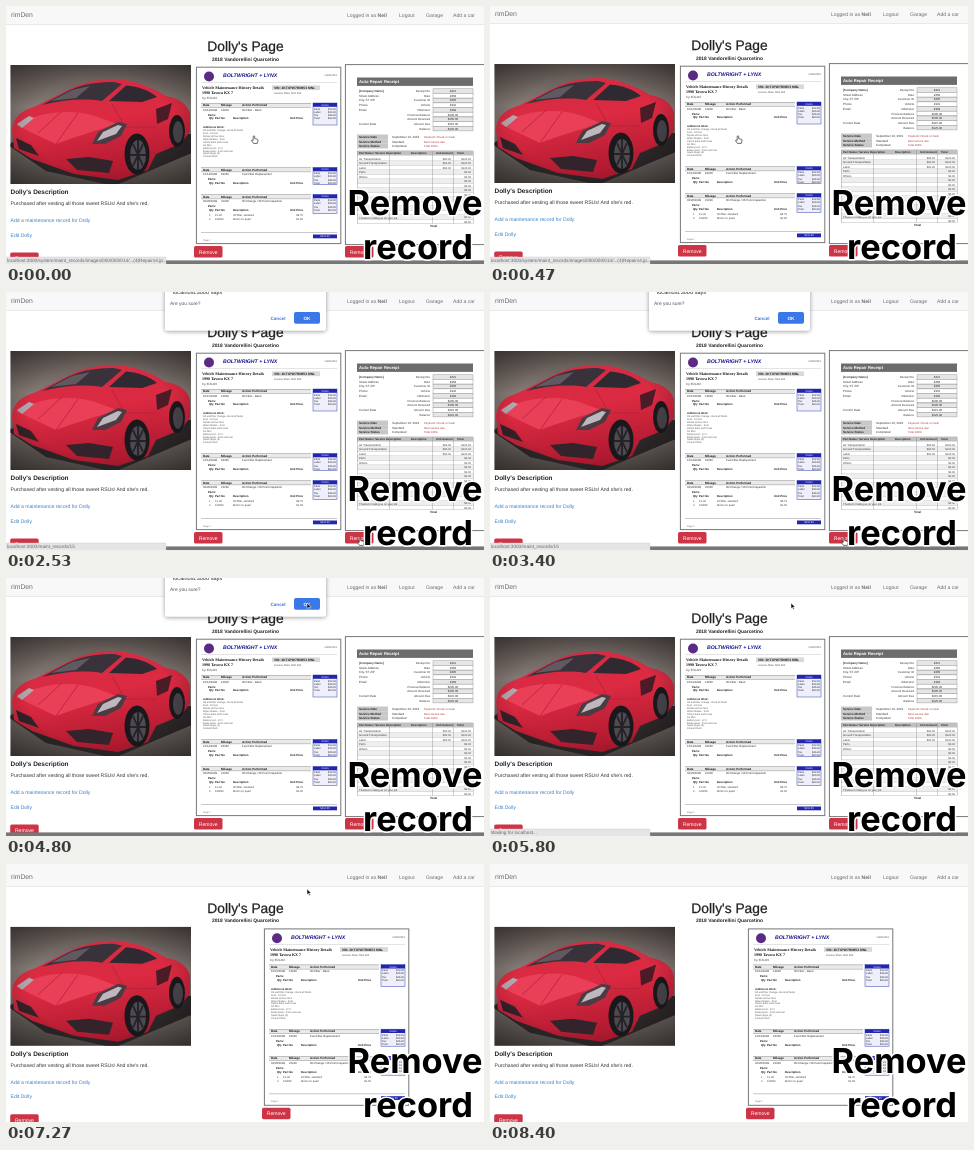
Animation, 478 px wide and 258 px high, one loop 8740 ms. Source, as an HTML page:

```html
<!DOCTYPE html>
<html lang="en">
<head>
<meta charset="utf-8">
<title>Remove record</title>
<style>
  html, body { margin: 0; width: 100%; height: 100%; overflow: hidden; background: #fff; }
  svg { display: block; width: 478px; height: 258px; font-family: "Liberation Sans", Arial, sans-serif; text-rendering: geometricPrecision; }
  .b { font-weight: bold; }
  .serif { font-family: "Liberation Serif", Times, serif; }
  .big { font: 700 34.4px Inter, "Open Sans", sans-serif; text-anchor: middle; paint-order: stroke; stroke: #fff; stroke-width: 3; stroke-linejoin: round; }
</style>
</head>
<body>
<svg id="stage" viewBox="0 0 478 258">
  <defs>
    <linearGradient id="wall" x2="0" y2="1">
      <stop offset="0" stop-color="#5a514d"/><stop offset=".35" stop-color="#857b76"/>
      <stop offset=".55" stop-color="#7a716c"/><stop offset="1" stop-color="#4f4946"/>
    </linearGradient>
    <linearGradient id="paint" x2=".3" y2="1">
      <stop offset="0" stop-color="#d22c43"/><stop offset=".5" stop-color="#dc2a42"/><stop offset="1" stop-color="#b01a30"/>
    </linearGradient>
    <radialGradient id="vignette" r=".72">
      <stop offset=".55" stop-opacity="0"/><stop offset="1" stop-opacity=".4"/>
    </radialGradient>
    <filter id="shadow" x="-10%" y="-30%" width="120%" height="170%">
      <feDropShadow dx="0" dy="1" stdDeviation="2" flood-opacity=".4"/>
    </filter>
    <filter id="soft"><feGaussianBlur stdDeviation=".6"/></filter>
    <clipPath id="frame"><rect x="4.5" y="59" width="180.5" height="119"/></clipPath>
  </defs>
  <g id="page">
    <g id="base"></g>
    <g id="car" clip-path="url(#frame)">
      <rect x="4" y="59" width="182" height="120" fill="url(#wall)"/>
      <g filter="url(#soft)">
        <path d="M2 139L40 165L108 180L188 146V128H20z" fill="#2b2628"/>
        <path d="M6 124C7 111 15 105 30 100L60 85C74 77 90 73 108 73C126 73 146 81 160 90C174 92 182 99 184 108L184 126L174 138L150 148L142 164L112 174L68 168L26 153L8 142z" fill="url(#paint)"/>
        <path d="M36 99L60 86C73 79 90 75.5 108 76L116 78L96 95C77 92 56 94 36 99z" fill="#39323a"/>
        <path d="M45 95L66 84L84 80L70 92z" fill="#605960"/>
        <path d="M103 95L120 79.5C132 80 144 85 151 91L136 96z" fill="#2f2a31"/>
        <path d="M10 119C34 105 68 102 92 111L111 118C92 124 68 131 50 138z" fill="#e94058"/>
        <path d="M50 138L72 107M32 127L56 105M106 98L119 121L150 121" fill="none" stroke="#b02238" stroke-width=".8"/>
        <path d="M86 138L92 126L112 116L121 118L115 130L99 138z" fill="#4b3c44"/>
        <path d="M91 135L97 126L112 119L116 120L110 128z" fill="#bdb8bd"/>
        <path d="M11 118L23 110L28 112L16 122z" fill="#b0a8ad"/>
        <path d="M10 132L25 139L33 150L13 143z" fill="#33232a"/>
        <path d="M60 153L83 151L107 155L103 167L71 164z" fill="#33232a"/>
        <path d="M150 103L166 97L162 113L151 118z" fill="#4b1c27"/>
        <ellipse cx="131" cy="148" rx="12.5" ry="20.5" fill="#1b181c"/>
        <ellipse cx="132" cy="149" rx="8" ry="15" fill="#4d4a50"/>
        <path d="M132 134V164M124 149H140M127 138L137 160M137 138L127 160" stroke="#242127" stroke-width="1.8"/>
        <ellipse cx="171" cy="125" rx="8" ry="16" fill="#1b181c"/>
        <ellipse cx="172" cy="126" rx="5" ry="11" fill="#454148"/>
      </g>
      <rect x="4" y="59" width="182" height="120" fill="url(#vignette)"/>
    </g>
    <g id="first"></g>
    <g id="second"></g>
  </g>
  <rect id="edge" y="254.4" width="478" height="3.6" fill="#777"/>
  <g id="status"><rect x="-2" y="251" height="9" rx="1" fill="#e4e5e7" stroke="#c8c8c8" stroke-width=".4"/><text x="1" y="256.3" font-size="4.7" fill="#666"></text></g>
  <g id="dialog"></g>
  <g id="arrow"><path d="M0 0V5.6L1.4 4.4L2.3 6.4L3.3 6L2.4 4H4.2z" fill="#111" stroke="#fff" stroke-width=".5"/></g>
  <g id="hand"><path d="M-.8 .2Q0-.7 .7 .2V2.6L3.6 3.4Q4.2 3.8 4 5L3.3 7.4H-.6L-2.5 4.6Q-2.4 3.5-.8 4.4z" fill="#fff" stroke="#222" stroke-width=".65"/></g>
  <text class="big" x="409" y="209">Remove</text>
  <text class="big" x="412" y="253">record</text>
</svg>
<script>
const LOOP = 8740;
const $ = id => document.getElementById(id);
const text = (x, y, size, s, fill = "#333", more = "") =>
  `<text x="${x}" y="${y}" font-size="${size}" fill="${fill}" ${more}>${s}</text>`;
const rect = (x, y, w, h, fill, more = "") =>
  `<rect x="${x}" y="${y}" width="${w}" height="${h}" fill="${fill}" ${more}/>`;
const rule = (x, y, w, fill = "#999", h = .4) => rect(x, y, w, h, fill);
const bold = 'class="b"', mid = 'text-anchor="middle"', end = 'text-anchor="end"';
const sheet = 'stroke="#777" stroke-width="1"';
const button = (x, y) => rect(x, y, 28.5, 11.5, "#cd3546", 'rx="1.6"') +
  text(x + 14.2, y + 7.6, 5.1, "Remove", "#fff", mid);

function basePage() {
  const link = "#3a80c4", grey = "#6c6c6c";
  return rect(0, -6, 478, 24.5, "#f8f8f8") + rule(0, 18.3, 478, "#dedede", .6) +
    text(5, 11.3, 6.8, "rimDen", grey) +
    text(341, 11, 5.1, 'Logged in as <tspan class="b">Neil</tspan>', grey) +
    text(393, 11, 5.1, "Logout", grey) +
    text(420, 11, 5.1, "Garage", grey) +
    text(447, 11, 5.1, "Add a car", grey) +
    text(239.5, 45, 13.8, "Dolly's Page", "#222", mid + ' stroke="#222" stroke-width=".25"') +
    text(239.5, 54.6, 4.9, "2018 Vandorellini Quarcetino", "#222", mid + " " + bold) +
    text(4.5, 188, 6.45, "Dolly's Description", "#222", bold) +
    text(4.5, 199, 5.1, "Purchased after vesting all those sweet RSUs! And she's red.") +
    text(4.5, 216, 5.1, "Add a maintenance record for Dolly", link) +
    text(4.5, 230.6, 5.1, "Edit Dolly", link) +
    button(4.2, 246.5);
}

// One service block: heading row, parts row and a cost box on the right
function service(y, date, miles, action, h) {
  const box = rect(307, y, 24, h, "#eeeffa", 'stroke="#3340b4" stroke-width=".5"') +
    rect(307, y, 24, 3.8, "#2026b0") + text(319, y + 2.9, 2.8, "Costs", "#fff", mid);
  let costs = "";
  ["Parts", "Labor", "Tax", "Total"].forEach((s, i) => {
    const ly = y + 6.6 + i * 3.2;
    if (ly < y + h) costs += text(308, ly, 2.6, s, "#222") + text(330, ly, 2.6, "$" + (12 + i * 17) + ".40", "#222", end);
  });
  return rect(195, y, 110, 4.2, "#e9e9e9") + rule(195, y, 110, "#777") + rule(195, y + 4.2, 110, "#777") +
    text(197, y + 3.3, 3, "Date", "#111", bold) + text(215, y + 3.3, 3, "Mileage", "#111", bold) +
    text(236, y + 3.3, 3, "Action Performed", "#111", bold) +
    text(197, y + 7.8, 2.8, date, "#222") + text(215, y + 7.8, 2.8, miles, "#222") + text(236, y + 7.8, 2.8, action, "#222") +
    text(202, y + 12.6, 2.8, "Parts:", "#111", bold) +
    text(203, y + 16.4, 2.8, "Qty", "#111", bold) + text(209, y + 16.4, 2.8, "Part No", "#111", bold) +
    text(227, y + 16.4, 2.8, "Description", "#111", bold) +
    text(284, y + 16.4, 2.8, "Unit Price", "#111", bold) + box + costs;
}

function history() {
  const serif = 'class="b serif"';
  let s = rect(190.4, 61.2, 144.4, 176.4, "#fff", sheet) +
    '<circle cx="203" cy="70.5" r="5" fill="#5b2a83"/>' +
    text(217, 71.4, 5.2, "BOLTWRIGHT + LYNX", "#16168e", bold + ' font-style="italic"') +
    text(331, 70, 2.6, "11/08/2019", "#555", end) + rule(195, 76.6, 136, "#bbb") +
    text(196, 83.2, 4, "Vehicle Maintenance History Details", "#111", serif) +
    text(196, 88.4, 4, "1998 Tavora KX 7", "#111", serif) +
    text(196, 92.9, 3.2, "Up $58,410", "#333", 'class="serif"') +
    rect(266, 79.4, 48, 4.7, "#d9d9d9") + text(268, 83, 3.3, "VIN: 2KT4PW7R0B53 MNL", "#222", bold) +
    text(268, 88, 2.6, "License Plate: 5KD 482", "#444") +
    service(97, "10/12/1998", "14900", "Oil Filter - Basic", 22);
  s += text(197, 122, 2.7, "Additional Work:", "#222", bold);
  ["Oil and filter change, check all fluids", "Fuel - 10 Gal.", "Rotate all four tires", "Wiper blades - front", "Check belts and hoses",
    "Air filter", "Battery test - 12 V", "Brake pads - front and rear", "Spark plugs (4)", "Coolant flush"]
    .forEach((v, i) => s += text(197, 125.2 + i * 2.9, 2.5, v, "#555"));
  return s + service(161.5, "12/14/1998", "18450", "Fuel Filter Replacement", 17) +
    service(188.5, "02/26/1999", "21300", "Oil Change / 36 Point Inspection", 19) +
    text(203, 210, 2.7, "1", "#333") + text(209, 210, 2.7, "FL-40", "#333") +
    text(227, 210, 2.7, "Oil filter, standard", "#333") + text(297, 210, 2.7, "$6.75", "#333", end) +
    text(203, 214, 2.7, "4", "#333") + text(209, 214, 2.7, "10W30", "#333") +
    text(227, 214, 2.7, "Motor oil, quart", "#333") + text(297, 214, 2.7, "$1.90", "#333", end) +
    rule(195, 226, 136, "#777") + rect(307, 228.5, 24, 3.8, "#2026b0") +
    text(319, 231.4, 2.7, "$412.65", "#fff", mid) + text(197, 234.6, 2.4, "Page 1", "#666") +
    button(188, 240);
}

function receipt() {
  let s = rect(339.4, 58.6, 150, 180, "#fff", sheet) +
    rect(351, 71.5, 116, 8.4, "#6c6c6c") + text(353, 77.4, 4.2, "Auto Repair Receipt", "#fff", bold);
  [["[Company Name]", "Receipt No"], ["Street Address", "Date"], ["City, ST ZIP", "Customer ID"], ["Phone", "Vehicle"],
    ["Email", "Odometer"], ["", "Previous Balance"], ["", "Amount Received"], ["Current Date", "Amount Due"], ["", "Balance"]]
    .forEach(([a, b], i) => {
      const y = 86 + i * 4.7;
      s += text(353, y, 3, a, "#333", i ? "" : bold) + text(424, y, 2.9, b, "#333", end) +
        rect(427, y - 3.2, 40, 4.5, i % 2 ? "#fff" : "#e6e6e6", 'stroke="#888" stroke-width=".4"') +
        text(447, y, 2.9, i < 5 ? 4821 + i * 37 : "$" + (245 + i * 10) + ".00", "#222", mid);
    });
  ["Service Date", "Service Method", "Service Status"].forEach((v, i) => {
    const y = 128.5 + i * 4.7;
    s += rect(351, y, 31, 4.6, "#c8c8c8") + text(353, y + 3.5, 3, v, "#222", bold) +
      text(386, y + 3.5, 3, ["September 10, 2019", "Standard", "Completed"][i], "#333") +
      text(418, y + 3.5, 2.8, ["Payment: Check or Cash", "Next service due", "Total 100%"][i], "#a33");
  });
  s += rect(351, 144.5, 116, 5, "#c0c0c0");
  [[353, "Part Name / Service Description"], [405, "Description"], [430, "Unit Amount"], [451, "Total"]]
    .forEach(([x, v]) => s += text(x, 148, 2.8, v, "#222", bold));
  const items = ["Air Transportation", "Ground Transportation", "Labor", "Parts", "Others"];
  for (let i = 0; i < 15; i++) {
    const y = 150 + i * 4.5;
    if (i % 2) s += rect(351, y, 116, 4.5, "#eee");
    s += rule(351, y + 4.5, 116, "#aaa", .4) + text(465, y + 3.5, 2.7, i < 3 ? "$120.00" : "$0.00", "#333", end);
    if (items[i]) s += text(353, y + 3.5, 2.8, items[i]);
    if (i < 3) s += text(445, y + 3.5, 2.7, "$60.00", "#333", end);
  }
  for (const x of [351, 383, 426, 447, 467]) s += rect(x, 145, .4, 72.5, "#888");
  return s + text(353, 212.5, 2.7, "Thanks for taking us on your job") + text(424, 221, 3, "Total", "#222", bold) +
    button(339, 240);
}

const dialogBox = rect(159, -10, 161, 48.5, "#fff", 'rx="2.5" filter="url(#shadow)"') +
  text(167, 2.2, 5.6, "localhost:3000 says", "#222") +
  text(164, 12.8, 4.9, "Are you sure?", "#555") +
  text(272, 27.7, 4.6, "Cancel", "#3b78e7", mid + " " + bold) +
  rect(288, 20, 26, 11.8, "#3b78e7", 'rx="1.8"') +
  text(301, 27.7, 4.6, "OK", "#fff", mid + " " + bold);

$("base").innerHTML = basePage();
$("first").innerHTML = history();
$("second").innerHTML = receipt();
$("dialog").innerHTML = dialogBox;

// time, x, y
const path = [[0, 248, 130], [1000, 248, 130], [1460, 351, 197], [1640, 351, 197], [1930, 354, 246],
  [3680, 354, 246], [4560, 301, 25], [LOOP, 301, 25]];
// start, stop, width, message
const root = "localhost:3000/";
const messages = [
  [0, 1480, 160, root + "system/maint_records/images/000/000/014/...(4)Repairs4.jp..."],
  [1480, 1800, 218, root + "system/maint_records/images/000/000/015/original/Auto-repair-receipt.jpg?1573202454"],
  [1800, 3720, 160, root + "maint_records/15"],
  [5800, 7100, 160, "Waiting for localhost..."]
];
const DIALOG = [2270, 5700], NUDGE = [100, 930], RELOAD = 6130, HIDE = 7600;
const within = (t, a, b) => t >= a && t < b;
const show = (id, on) => $(id).setAttribute("visibility", on ? "visible" : "hidden");
const move = (id, x, y) => $(id).setAttribute("transform", `translate(${x} ${y})`);

function pointer(t) {
  const i = Math.max(1, path.findIndex(p => p[0] > t));
  const [t0, x0, y0] = path[i - 1], [t1, x1, y1] = path[i];
  const k = (t - t0) / (t1 - t0), e = k * k * (3 - 2 * k);
  return [x0 + (x1 - x0) * e, y0 + (y1 - y0) * e];
}

function draw(t) {
  const done = t >= RELOAD;
  move("page", 0, done ? 3.7 : within(t, ...NUDGE) ? -1 : 0);
  move("first", done ? 68 : 0, 0);
  show("second", !done);
  show("edge", !done);
  show("dialog", within(t, ...DIALOG));

  const note = messages.find(m => within(t, m[0], m[1]));
  show("status", note);
  if (note) {
    const [box, label] = $("status").children;
    box.setAttribute("width", note[2] + 2);
    if (label.textContent !== note[3]) label.textContent = note[3];
  }

  const [x, y] = pointer(t), grab = t < 3720;
  move("hand", x, y);
  move("arrow", x, y);
  show("hand", grab);
  show("arrow", !grab && t < HIDE);
}

const start = performance.now();
function tick() {
  draw((performance.now() - start) % LOOP);
  requestAnimationFrame(tick);
}
tick();
</script>
</body>
</html>
```
